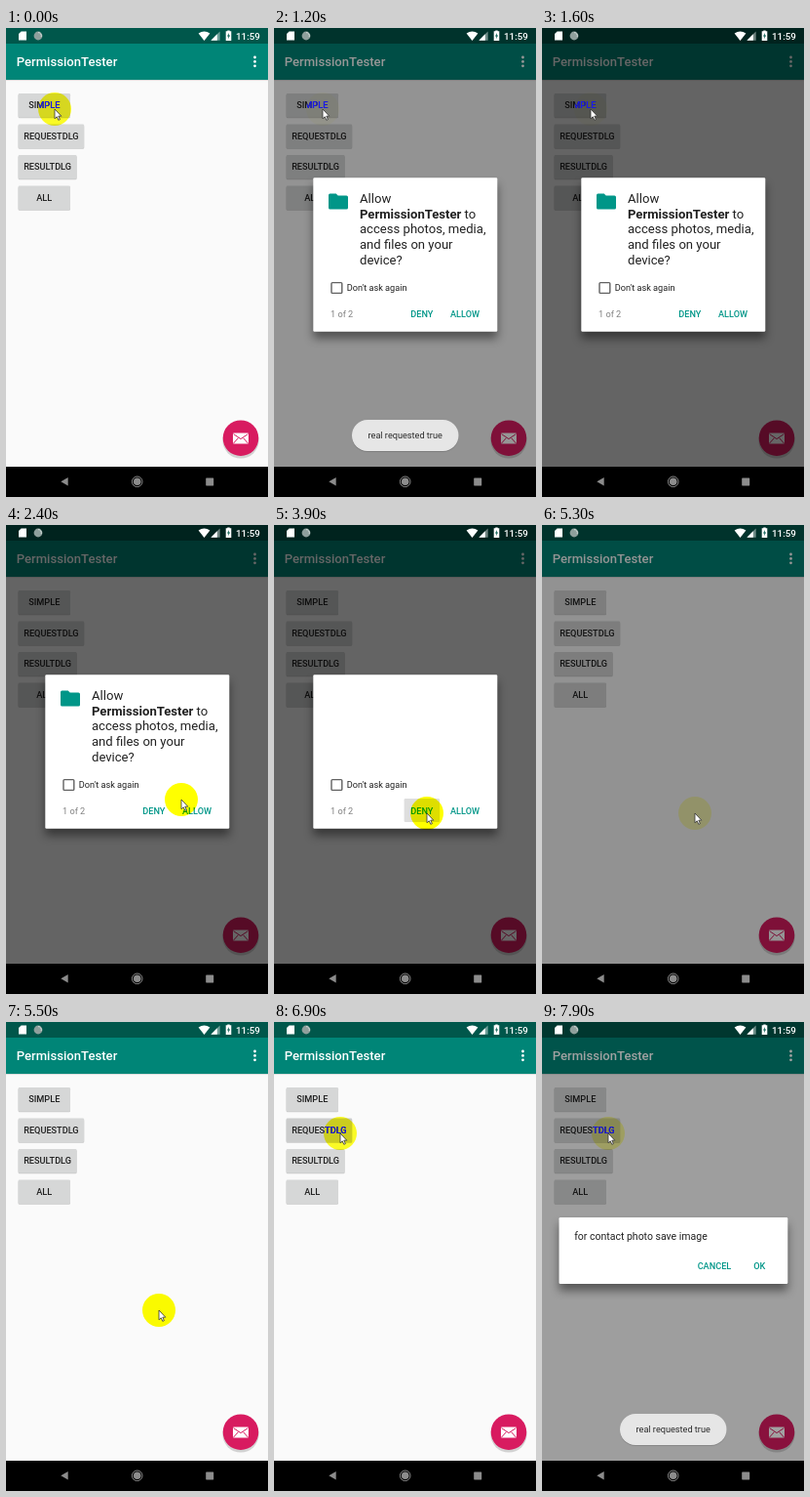
Write an HTML page that moves like this. It is 269 by 480 pixels and loops after 8000 ms.

```html
<!DOCTYPE html>
<html lang="en">
<head>
<meta charset="utf-8">
<title>Permission dialogs</title>
<style>
  html, body { margin: 0; width: 100%; height: 100%; overflow: hidden; background: #000; }
  svg { display: block; width: 100%; height: 100%; font-family: Roboto, sans-serif; font-size: 9.16px; }
  .mid { text-anchor: middle; }
  .btn { font-weight: 500; fill: #1f1f1f; }
  .act { font-weight: 500; fill: #009688; }
  .big { font-size: 13.1px; fill: #212121; }
  .card { filter: drop-shadow(0 7px 5px rgba(0, 0, 0, .45)); }
  #glow { mix-blend-mode: multiply; }
</style>
</head>
<body>
<svg viewBox="0 0 269 480" preserveAspectRatio="none">
  <defs>
    <clipPath id="spot"><circle id="spotHole" r="17"/></clipPath>
  </defs>

  <!-- app -->
  <rect width="269" height="450" fill="#fafafa"/>
  <rect y="52" width="269" height="2" fill="#000" opacity=".12"/>
  <rect width="269" height="53" fill="#008577"/>
  <rect width="269" height="16" fill="#00574b"/>
  <text x="10.8" y="39.3" font-size="13.1" font-weight="500" fill="#fff">PermissionTester</text>
  <g fill="#fff">
    <circle cx="255.5" cy="30" r="1.4"/><circle cx="255.5" cy="34.4" r="1.4"/><circle cx="255.5" cy="38.8" r="1.4"/>
  </g>
  <g id="buttons"></g>
  <g>
    <circle cx="241" cy="422" r="18.6" fill="#000" opacity=".16"/>
    <circle cx="241" cy="419.7" r="18.3" fill="#d81b60"/>
    <rect x="233" y="414.6" width="16" height="11" rx="1" fill="#fff"/>
    <path d="M233.6 415.6L241 420.6L248.4 415.6M233.6 425L238.4 419.6M248.4 425L243.6 419.6" fill="none" stroke="#d81b60" stroke-width="1"/>
  </g>

  <rect id="dim" width="269" height="449"/>

  <!-- status bar -->
  <g fill="#fff">
    <path d="M15.6 3.5H21V12.5H13V6.1Z"/>
    <circle cx="33" cy="8" r="4.4" fill="#8f9f9c"/>
    <path d="M33 4.6A3.4 3.4 0 0 1 36.2 9" fill="none" stroke="#d5dedc" stroke-width="1"/>
    <path d="M203.5 13L197.6 5.6Q203.5 1.4 209.4 5.6Z"/>
    <path d="M219.6 3.4V12.8H210.4Z" opacity=".45"/>
    <path d="M216.8 6.3V12.8H210.4Z"/>
    <path d="M227.3 3.2V2.4H229.7V3.2H231.3V13H225.7V3.2Z"/>
    <path d="M229 5L227 8.6H228.4L228 11.2L230.1 7.6H228.7Z" fill="#00574b"/>
    <text x="236" y="12" font-size="9.8" font-weight="500">11:59</text>
  </g>

  <!-- navigation bar -->
  <rect y="449" width="269" height="31"/>
  <g fill="#8c8c8c">
    <path d="M56.3 464.3L63.7 460V468.6Z"/>
    <circle cx="134.7" cy="464.3" r="3.8"/>
    <circle cx="134.7" cy="464.3" r="5.3" fill="none" stroke="#8c8c8c" stroke-width="1"/>
    <rect x="205.2" y="460.4" width="8" height="8" rx=".6"/>
  </g>

  <!-- permission dialog -->
  <g id="ask">
    <rect class="card" x="40.3" y="153.3" width="189" height="157.5" rx="1.3" fill="#fff"/>
    <g id="page1">
      <path d="M57.5 169.5H63.7L65.7 171.5H74.4Q76 171.5 76 173V184Q76 185.6 74.4 185.6H57.5Q56 185.6 56 184V171Q56 169.5 57.5 169.5Z" fill="#009688"/>
      <text class="big" id="lines1"></text>
    </g>
    <g id="page2">
      <g fill="#009688"><circle cx="66" cy="173.5" r="4"/><path d="M57.5 186V183.5Q59 179.3 66 179.3T74.5 183.5V186Z"/></g>
      <text class="big" id="lines2"></text>
    </g>
    <rect x="59" y="260.6" width="10.8" height="10.8" rx="1" fill="none" stroke="#616161" stroke-width="1.4"/>
    <text x="74.8" y="269.4" fill="#212121">Don't ask again</text>
    <text id="count" x="58" y="295.6" fill="#808080"></text>
    <rect id="press" x="133.6" y="280" width="36.5" height="24" rx="1.3" fill="#dedede"/>
    <text class="act mid" x="151.8" y="295.6">DENY</text>
    <text class="act mid" x="196" y="295.6">ALLOW</text>
  </g>

  <!-- rationale dialog -->
  <g id="why">
    <rect class="card" x="17.5" y="200" width="234.8" height="68" rx="1.3" fill="#fff"/>
    <text x="33.2" y="222.6" font-size="10.5" fill="#212121">for contact photo save image</text>
    <text class="act mid" x="177" y="253.2">CANCEL</text>
    <text class="act mid" x="223.3" y="253.2">OK</text>
  </g>

  <!-- toast -->
  <g id="toast">
    <rect x="80" y="402" width="109.5" height="32" rx="16" opacity=".15"/>
    <rect x="80" y="401" width="109.5" height="32" rx="16" fill="#e6e6e6"/>
    <text class="mid" x="134.7" y="420.3" fill="#2b2b2b">real requested true</text>
  </g>

  <!-- pointer -->
  <circle id="glow" r="17" fill="#ff0"/>
  <g id="blue" clip-path="url(#spot)"></g>
  <path id="arrow" d="M0 0V9.8L2.2 7.8L3.8 11.3L5.4 10.6L3.8 7.2H6.8Z" fill="#fff" stroke="#333" stroke-width=".8"/>
</svg>
<script>
const LOOP = 8000, STEP = 100;
const el = id => document.getElementById(id);
const fade = (id, v) => el(id).setAttribute('opacity', v);

const buttons = [['SIMPLE', 53.4, 67], ['REQUESTDLG', 67.6, 98.5], ['RESULTDLG', 60, 130], ['ALL', 53.4, 161.5]];
const caption = ([s, w, y], extra = '') =>
  `<text class="btn mid" x="${12.6 + w / 2}" y="${y + 15.4}" ${extra}>${s}</text>`;

el('buttons').innerHTML = buttons.map((b, i) => {
  const box = `x="12.6" y="${b[2]}" width="${b[1]}" height="24.4" rx="1.3"`;
  return `<rect ${box} transform="translate(0 .9)" opacity=".2"/><rect ${box} fill="#d6d7d7"/>` +
    `<rect id="tap${i}" ${box} opacity="0"/>` + caption(b);
}).join('');
el('blue').innerHTML = buttons.slice(0, 2).map(b => caption(b, 'style="fill:#1a1af0"')).join('');

const lines = (id, rows) => el(id).innerHTML = rows.map((s, i) =>
  `<tspan x="88" y="${178.9 + i * 15.7}">${s}</tspan>`).join('');
const app = '<tspan font-weight="700">PermissionTester</tspan> to';
lines('lines1', ['Allow', app, 'access photos, media,', 'and files on your', 'device?']);
lines('lines2', ['Allow', app, 'access your contacts?']);

// Each key is [time, value]; values between keys are linear.
const tracks = {
  dim: [[700, 0], [1200, .41], [1400, .6], [5000, .6], [5300, .42], [5500, 0], [7400, 0], [7900, .37]],
  ask: [[700, 0], [1000, 1], [4900, 1], [5200, 0]],
  why: [[7400, 0], [7700, 1]],
  toast: [[100, 0], [400, 1], [1300, 1], [1600, 0], [6900, 0], [7300, 1]],
  page1: [[3500, 1], [3900, 0]],
  page2: [[4000, 0], [4400, 1]],
  press: [[3500, 0], [3700, 1], [4000, 1], [4200, 0], [4400, 0], [4700, 1]],
  tap0: [[0, 0], [200, .1], [500, 0]],
  tap1: [[6800, 0], [7000, .1], [7300, 0]],
  glow: [[0, .85], [700, .85], [1200, .06], [1600, .06], [2200, 1], [5000, 1], [5200, .28], [5300, .28],
    [5500, 1], [6500, .85], [7400, .85], [7900, .38]]
};
const pathX = [[1600, 50], [2300, 180], [2500, 180], [2900, 193], [3500, 157], [5700, 157], [6500, 68]];
const pathY = [[1600, 83], [2300, 281], [2500, 281], [2900, 292], [3500, 295], [5700, 295], [6500, 114]];

const smooth = p => p * p * (3 - 2 * p);
function at(keys, t, ease = p => p) {
  const i = keys.findIndex(k => k[0] > t);
  if (i === 0) return keys[0][1];
  if (i < 0) return keys[keys.length - 1][1];
  const [t0, a] = keys[i - 1], [t1, b] = keys[i];
  return a + (b - a) * ease((t - t0) / (t1 - t0));
}

function draw(t) {
  for (const id in tracks) fade(id, at(tracks[id], t));
  el('count').textContent = t < 4100 ? '1 of 2' : '2 of 2';
  const move = `translate(${at(pathX, t, smooth)} ${at(pathY, t, smooth)})`;
  for (const id of ['glow', 'spotHole', 'arrow']) el(id).setAttribute('transform', move);
}

const start = performance.now();
function tick() {
  const t = (performance.now() - start) % LOOP;
  draw(Math.floor(t / STEP) * STEP);
  requestAnimationFrame(tick);
}
tick();
</script>
</body>
</html>
```
